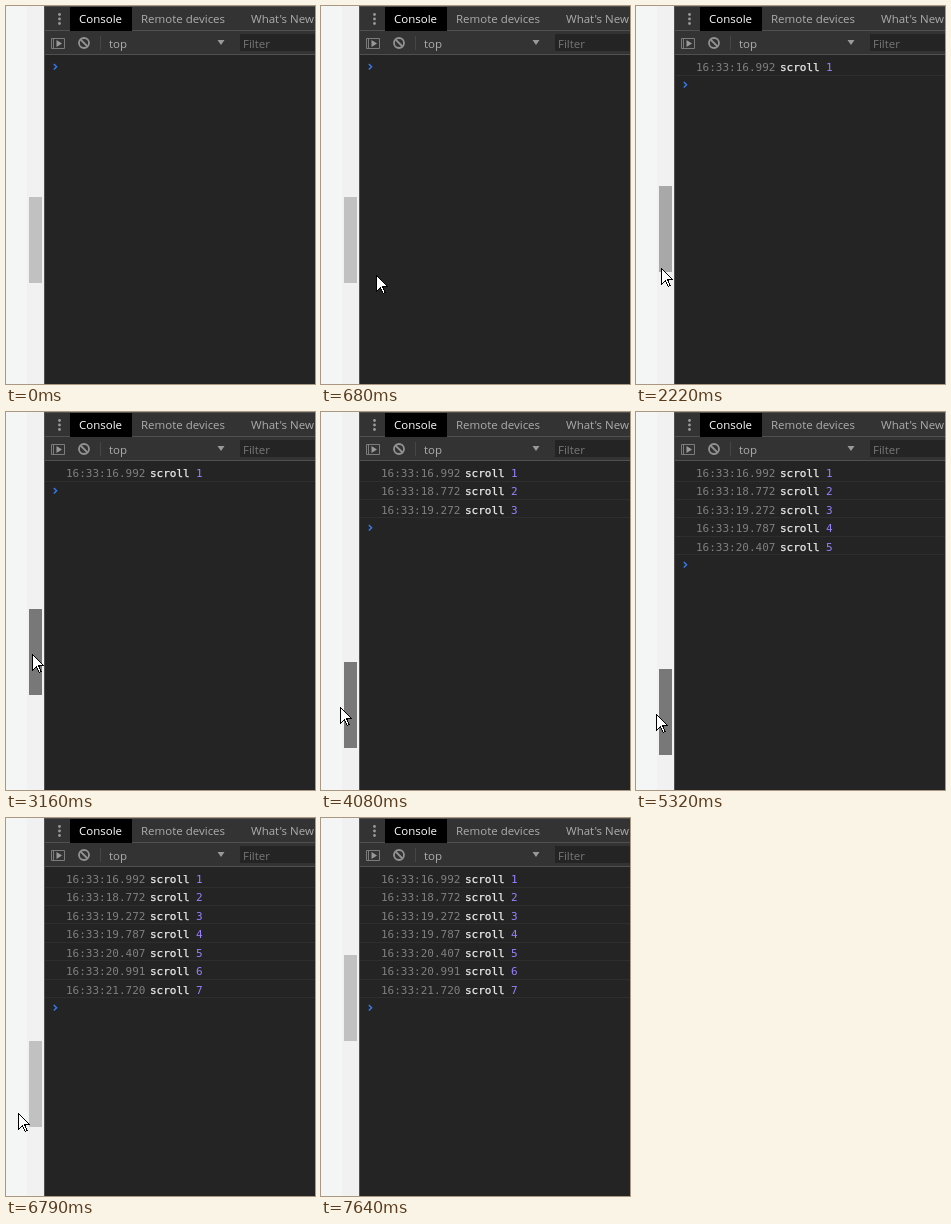
Write an HTML page that moves like this. It is 309 px wide and 378 px high and loops after 8000 ms.

```html
<!DOCTYPE html>
<html lang="en">
<head>
<meta charset="utf-8">
<title>Scroll log</title>
<style>
html, body { margin: 0; width: 100%; height: 100%; overflow: hidden; background: #242424; }
svg { display: block; }
.ui { font: 11.5px "Open Sans", "Noto Sans", sans-serif; fill: #adadad; }
.log { font: 11px "DejaVu Sans Mono", monospace; }
</style>
</head>
<body>
<svg width="309" height="378" viewBox="0 0 309 378">
  <rect width="309" height="378" fill="#242424"/>
  <rect width="22" height="378" fill="#f4f5f5"/>
  <rect x="21" width="17" height="378" fill="#f1f1f1"/>
  <rect id="thumb" x="23" width="13" height="86"/>

  <rect x="38" width="271" height="49" fill="#333"/>
  <path d="M38 .5H309M38 24.5H309M38 48.5H309M38.5 0V378" stroke="#505050"/>
  <rect x="64" y="1" width="62" height="24" fill="#000"/>
  <g fill="#999">
    <circle cx="53.5" cy="8.5" r="1.4"/>
    <circle cx="53.5" cy="13" r="1.4"/>
    <circle cx="53.5" cy="17.5" r="1.4"/>
    <path d="M50.5 34v7l5.5-3.5zM211.5 34h7l-3.5 5z"/>
  </g>
  <path d="M45.5 32.5h13v10h-13zM47.5 32.5v10" fill="none" stroke="#7c7c7c"/>
  <g fill="none" stroke="#929292" stroke-width="1.8">
    <circle cx="78" cy="37" r="5"/>
    <path d="M74.5 33.5l7 7"/>
  </g>
  <path d="M94.5 30V44" stroke="#464646"/>
  <rect x="234" y="28" width="75" height="17" fill="#242424"/>
  <g class="ui">
    <text x="73" y="17" fill="#fff">Console</text>
    <text x="135" y="17">Remote devices</text>
    <text x="245" y="17">What's New</text>
    <text x="103" y="42">top</text>
    <text x="237" y="42" fill="#777">Filter</text>
  </g>
  <g id="rows" class="log"></g>
  <path id="prompt" d="M47.8 58l2.8 2.7-2.8 2.7" fill="none" stroke="#367cf1" stroke-width="1.4"/>
  <path id="cursor" d="M.5 .5V16.5L4.5 12.5 7.2 18.5 9 17.5 6.6 11.5H11.5Z"
    fill="#fff" stroke="#000" shape-rendering="crispEdges"/>
</svg>
<script>
const LOOP = 8000, START = 210, STEP = 77.3, PITCH = 18.42;
const TOP = 191, HEIGHT = 86, CLOCK = 15.25;
const $ = id => document.getElementById(id);
const thumb = $('thumb'), cursor = $('cursor'), prompt = $('prompt');

// Seconds on the console clock; each entry appears when playback reaches it.
const stamps = [16.992, 18.772, 19.272, 19.787, 20.407, 20.991, 21.720];

// Pointer waypoints: [step, x, y]
const path = [[0, 117, 337], [8, 34, 246], [13, 33, 247], [14, 32, 236], [20, 6, 321],
  [26, 25, 262], [34, 28, 225], [45, 23, 273], [50, 19, 295], [58, 16, 319], [64, 16, 319],
  [66, 20, 302], [74, 28, 268], [80, 28, 268], [83, 0, 292], [85, 12, 295], [87, 28, 292],
  [92, 30, 292], [95, 53, 206]];

// First and last step with the button held; the thumb follows the pointer.
const drags = [[12, 14], [34, 77], [92, 95]];
const lastStep = path[path.length - 1][0];

function pointer(k) {
  const i = Math.max(1, path.findIndex(p => p[0] >= k));
  const [k0, x0, y0] = path[i - 1], [k1, x1, y1] = path[i];
  const f = (k - k0) / (k1 - k0);
  return { x: Math.round(x0 + (x1 - x0) * f), y: Math.round(y0 + (y1 - y0) * f) };
}

function thumbTop(k) {
  return drags.filter(d => k > d[0]).reduce((top, [from, to]) =>
    top + pointer(Math.min(k, to)).y - pointer(from).y, TOP);
}

$('rows').innerHTML = stamps.map((s, i) => `<g>
  <path d="M39 ${69.5 + Math.floor(i * PITCH)}H309" stroke="#2e2e2e"/>
  <g transform="translate(0 ${65 + Math.round(i * PITCH)})">
    <text x="60" fill="#7f7f7f">16:33:${s.toFixed(3)}</text>
    <text x="144" fill="#eee" stroke="#eee" stroke-width=".25">scroll</text>
    <text x="190" fill="#9980ff">${i + 1}</text>
  </g></g>`).join('');
const rows = [...$('rows').children];

function show(el, on) {
  el.setAttribute('visibility', on ? 'visible' : 'hidden');
}

function draw(t) {
  const k = Math.floor((t - START + 5) / STEP);
  const seconds = CLOCK + (START + k * STEP) / 1000;
  const visible = k >= 0 && k <= lastStep;
  const { x, y } = pointer(Math.min(Math.max(k, 0), lastStep));
  const top = thumbTop(k);
  const held = drags.some(([from, to]) => k >= from && k <= to);
  const over = visible && x >= 22 && x < 37 && y >= top && y < top + HEIGHT;
  thumb.setAttribute('y', top);
  thumb.setAttribute('fill', held ? '#787878' : over ? '#a8a8a8' : '#c1c1c1');
  cursor.setAttribute('transform', `translate(${x} ${y})`);
  show(cursor, visible);
  const count = stamps.filter(s => s <= seconds).length;
  rows.forEach((row, i) => show(row, i < count));
  prompt.setAttribute('transform', `translate(0 ${Math.round(count * PITCH)})`);
}

const begin = performance.now();
function tick() {
  draw((performance.now() - begin) % LOOP);
  requestAnimationFrame(tick);
}
tick();
</script>
</body>
</html>
```
